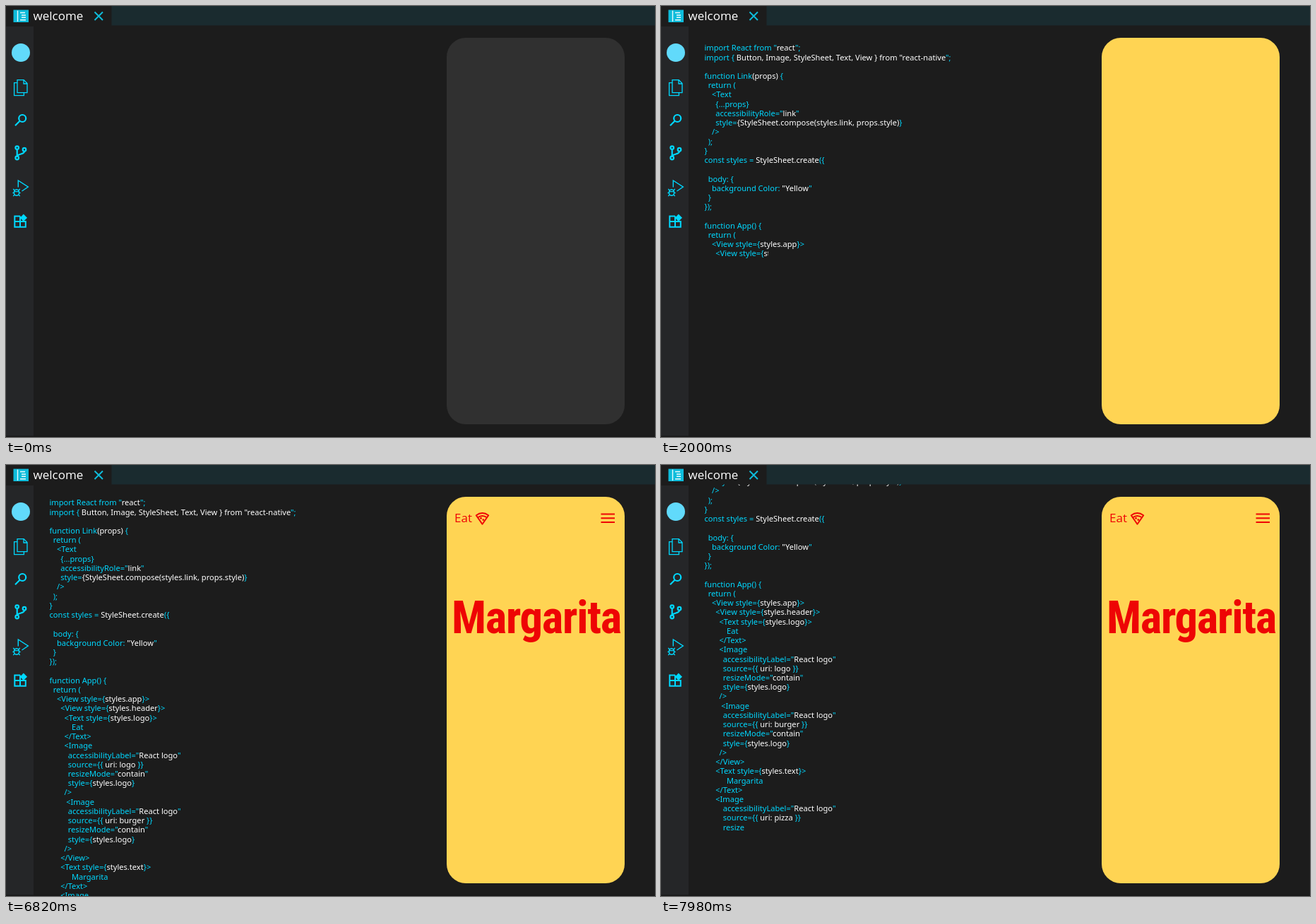
An HTML page that plays this animation: 919 by 610 pixels, repeating every 8 s.

```html
<!DOCTYPE html>
<html lang="en">
<head>
<meta charset="utf-8">
<title>Code to app</title>
<style>
  html, body { margin: 0; width: 100%; height: 100%; overflow: hidden; background: #1c1c1c; }
  svg { display: block; width: 100vw; height: 100vh; }
  text { white-space: pre; }
  .ui { font: 17px "Open Sans", "Noto Sans", sans-serif; }
  #code { font: 11.1px "Noto Sans", "Open Sans", sans-serif; fill: #00d8ff; }
  #code .hi { fill: #fff; }
  #title {
    font-family: "Roboto Condensed", "Open Sans Condensed", Roboto, sans-serif;
    font-weight: 700; font-stretch: condensed; letter-spacing: -.02em; text-anchor: middle;
  }
  .line { fill: none; stroke: #00d8ff; }
  .red { fill: #ee0505; }
  .redline { fill: none; stroke: #ee0505; stroke-width: 2; }
</style>
</head>
<body>
<svg viewBox="0 0 919 610">
  <defs>
    <clipPath id="editor"><rect x="39" y="27.5" width="585" height="583"/></clipPath>
  </defs>
  <rect width="919" height="610" fill="#1c1c1c"/>
  <rect width="919" height="27.5" fill="#1a2b2f"/>
  <rect width="149.5" height="28" fill="#1c1c1c"/>
  <rect y="29" width="39" height="581" fill="#252628"/>
  <rect y="608.5" width="919" height="1.5" fill="#171717"/>

  <rect x="10.5" y="5.5" width="21.5" height="17.5" fill="#0ebcdb"/>
  <path d="M16.5 6.5V22" stroke="#e8fbff" stroke-width="1.4"/>
  <path d="M20 9.5H27M22 13H28M22 16.3H28M20 19.8H28" stroke="#e8fbff" stroke-width="1.4"/>
  <text class="ui" x="38.5" y="20" fill="#fff">welcome</text>
  <path d="M125.5 8.5L137 20M137 8.5L125.5 20" stroke="#0ebcdb" stroke-width="2"/>

  <circle cx="21" cy="66" r="13" fill="#61dafb"/>
  <g class="line" stroke-width="1.3">
    <path d="M16 104.6H25.2L30 109.6V122.6H16ZM25 104.6V110H30"/>
    <path d="M16 108.6H11.6V126.6H25.4V122.6"/>
  </g>
  <g class="line" stroke-width="2.2">
    <circle cx="23.2" cy="159" r="5"/>
    <path d="M19.5 162.8L13 169.2"/>
    <circle cx="15.7" cy="200.6" r="2.3"/>
    <circle cx="26" cy="203.2" r="2.3"/>
    <circle cx="15.7" cy="215" r="2.3"/>
    <path d="M15.7 203V212.6M26 205.6C26 210.5 19 208.5 15.9 212"/>
  </g>
  <g class="line" stroke-width="1.4">
    <path d="M17.3 256.5V247L31.3 256L22.5 262"/>
    <ellipse cx="15" cy="264" rx="3.6" ry="4.3"/>
    <path d="M11.6 262.6H18.4M11.4 264.5H9.4M18.6 264.5H20.6M12.4 261L10.2 259M17.6 261L19.8 259M12.4 267L10.2 269M17.6 267L19.8 269"/>
  </g>
  <path class="line" stroke-width="2" d="M20 297.5H12.3V312.8H27.8V305H12.3M20 297.5V312.8"/>
  <path d="M24.8 294.5L30 299.8L24.8 305L19.8 299.8Z" fill="#00d8ff"/>

  <g clip-path="url(#editor)"><g id="code"></g></g>

  <rect id="phone" x="624" y="45" width="252" height="547" rx="27"/>
  <g id="header">
    <text class="ui red" x="635" y="81.3">Eat</text>
    <path class="redline" stroke-linejoin="round" d="M665.8 71.3Q674.5 64.8 683.2 71.3L674.5 83.8ZM668 74.2Q674.5 69.6 681 74.2"/>
    <circle class="red" cx="672.5" cy="75.3" r="1.4"/>
    <circle class="red" cx="675.8" cy="77.6" r="1.4"/>
    <path class="redline" d="M842.5 69.5H862M842.5 75.2H862M842.5 81H862"/>
  </g>
  <text id="title" class="red" x="751" y="238">Margarita</text>
</svg>
<script>
const LOOP = 8000, LEFT = 61.5, INDENT = 5.25, TOP = 63.3, PITCH = 13.23;
const NS = "http://www.w3.org/2000/svg";
const $ = id => document.getElementById(id);

// [indent, typing ms, text, wait ms]; ~ switches the highlight on and off
const LINES = [
  [0, 100, 'import React from "~react~";'],
  [0, 100, 'import { ~Button, Image, StyleSheet, Text, View } from "react-native~";'],
  [],
  [0, 50, 'function Link~(props) ~{'],
  [1, 50, 'return ('],
  [2, 50, '<Text'],
  [3, 50, '{...props}'],
  [3, 50, 'accessibilityRole="~link~"'],
  [3, 50, 'style=~{StyleSheet.compose(styles.link, props.style)~}'],
  [2, 25, '/>'],
  [1, 25, ');'],
  [0, 25, '}'],
  [0, 75, 'const styles = ~StyleSheet.create~({'],
  [],
  [1, 50, 'body: {'],
  [2, 290, 'background Color: ~"Yellow~"'],
  [1, 100, '}'],
  [0, 110, '});'],
  [],
  [0, 300, 'function App() {'],
  [1, 200, 'return ('],
  [2, 200, '<View style={~styles.app~}>'],
  [3, 200, '<View style={~styles.header~}>'],
  [4, 200, '<Text style={~styles.logo~}>'],
  [6, 100, 'Eat'],
  [4, 200, '</Text>'],
  [4, 300, '<Image'],
  [5, 300, 'accessibilityLabel="~React logo~"'],
  [5, 300, 'source={{~ uri: logo ~}}'],
  [5, 300, 'resizeMode="~contain~"'],
  [5, 250, 'style={~styles.logo~}'],
  [4, 100, '/>'],
  [4.5, 250, '<Image'],
  [5, 300, 'accessibilityLabel="~React logo~"'],
  [5, 300, 'source={{~ uri: burger ~}}'],
  [5, 300, 'resizeMode="~contain~"'],
  [5, 200, 'style={~styles.logo~}'],
  [4, 50, '/>'],
  [3, 150, '</View>'],
  [3, 150, '<Text style={~styles.text~}>'],
  [6, 150, 'Margarita'],
  [3, 150, '</Text>'],
  [3, 150, '<Image'],
  [5, 300, 'accessibilityLabel="~React logo~"', 1000],
  [5, 300, 'source={{~ uri: pizza ~}}'],
  [5, 300, 'resizeMode="~contain~"']
];

function add(parent, tag, attrs) {
  const node = document.createElementNS(NS, tag);
  for (const key in attrs) node.setAttribute(key, attrs[key]);
  return parent.appendChild(node);
}

let clock = 0;
const typed = [];
LINES.forEach(([indent, ms, source, wait = 0], row) => {
  if (!source) return;
  const x = LEFT + indent * INDENT, y = TOP + row * PITCH;
  const clip = add($("code"), "clipPath", { id: "row" + row });
  const mask = add(clip, "rect", { x: x - 1, y: y - 11, height: 15, width: 0 });
  const text = add($("code"), "text", { x, y, "clip-path": `url(#row${row})` });
  source.split("~").forEach((part, i) => {
    add(text, "tspan", i % 2 ? { class: "hi" } : {}).textContent = part;
  });
  clock += wait;
  typed.push({ mask, start: clock, end: clock + ms, width: text.getComputedTextLength() + 2 });
  clock += ms;
});

// Largest title size that stays within the phone
const title = $("title");
title.style.fontSize = "67px";
title.style.fontSize = 67 * Math.min(1, 240 / title.getComputedTextLength()) + "px";

const ramp = (t, from, to) => Math.min(1, Math.max(0, (t - from) / (to - from)));
const mix = (a, b, k) => a.map((v, i) => Math.round(v + (b[i] - v) * k));

function draw(t) {
  for (const { mask, start, end, width } of typed) {
    mask.setAttribute("width", width * ramp(t, start, end));
  }
  $("code").setAttribute("transform", `translate(0 ${-142 * ramp(t, 6800, 7300)})`);
  $("phone").setAttribute("fill", `rgb(${mix([48, 48, 48], [255, 212, 83], ramp(t, 900, 1000))})`);
  $("header").setAttribute("opacity", ramp(t, 5700, 5800));
  title.setAttribute("opacity", ramp(t, 6000, 6100));
}

function tick() {
  draw(performance.now() % LOOP);
  requestAnimationFrame(tick);
}
draw(0);
tick();
</script>
</body>
</html>
```
